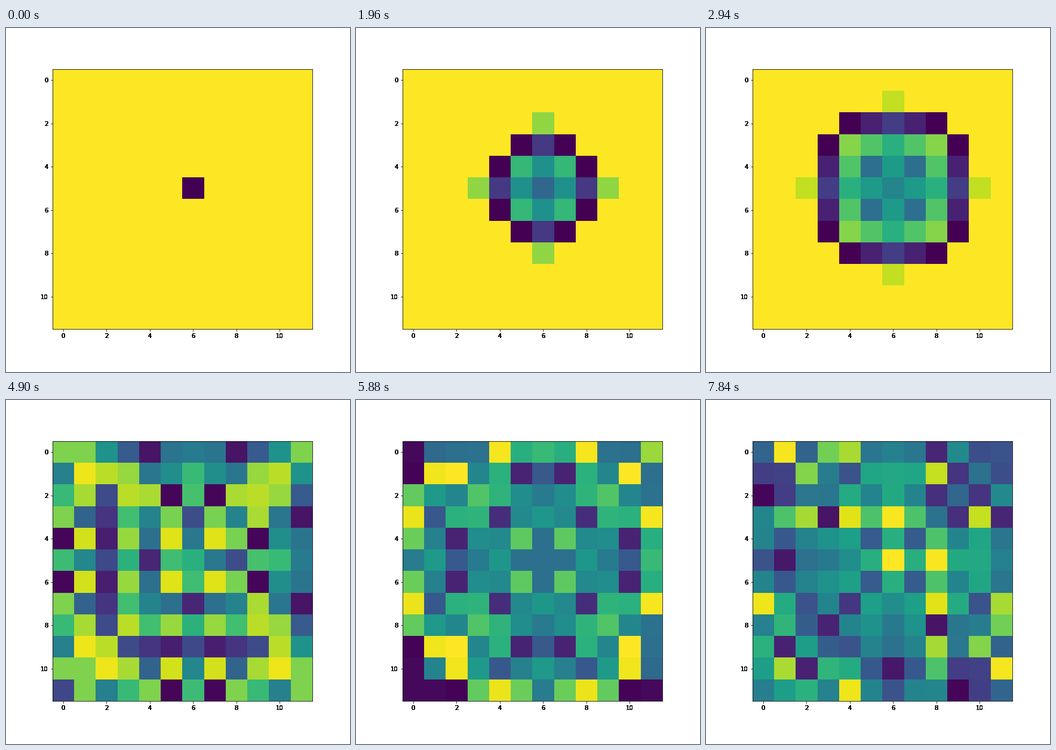
These frames come from a looping animation (576x576 px, 8 s). A matplotlib script:

```python
import numpy as np
import matplotlib.pyplot as plt
from matplotlib.animation import FuncAnimation

SIZE = 12
ROW, COL = 5, 6          # cell where the pattern starts
HOLD, INTERVAL, LOOP = 980, 20, 8000

rows, cols = np.indices((SIZE, SIZE))
dy, dx = abs(rows - ROW), abs(cols - COL)
ring, side = np.maximum(dy, dx), np.minimum(dy, dx)
steps = dy + dx


def rings(axis, slope, ripple=0):
    """Square rings: value on the axis, change per cell, extra on odd cells."""
    axis, slope, ripple = np.broadcast_arrays(axis, slope, ripple)
    r = np.minimum(ring, len(axis) - 1)
    return axis[r] + slope[r] * side + ripple[r] * (side % 2)


def wave(top, reach, axis, slope, ripple=0):
    """Spreading rings with a dark front, four tips and a calm outside."""
    tip = len(axis) - 1
    grid = rings(axis, slope, ripple) / top
    grid[(steps == reach) & (side > 0)] = 0
    grid[(steps > reach) | (ring > tip) | ((ring == tip) & (side > 0))] = 1
    return grid


def tangle(seed, band, core=None, radius=-1):
    """Noise mirrored near both axes and across the rising diagonal."""
    grid = np.random.default_rng(seed).random((SIZE, SIZE))
    for d in range(1, band + 1):
        grid[ROW + d] = grid[ROW - d]
        grid[:, COL + d] = grid[:, COL - d]
    grid = np.where(rows + cols < SIZE, grid, grid[::-1, ::-1].T)
    return grid if core is None else np.where(ring <= radius, core, grid)


crossed = tangle(6, 4, rings([.37, .37, .53, .41, .28],
                             [0, .38, -.2, .12, .18],
                             [0, 0, .14, -.04, -.36]), 4)
crossed[steps > 10] = 0.02

states = [
    wave(1, 0, [0], 0),
    wave(4, 2, [2, 1, 3], 0),
    wave(6, 3, [2, 3, 1, 5], [0, 1, -1, 0]),
    wave(11, 5, [5, 6, 7, 2, 10], [0, -2, 1, -1, 0]),
    wave(17, 8, [12, 9, 2, 14, 11, 6, 16], [0, 4, -.5, -3, 0, -1, 0],
         [0, 0, 1.5, 3, 5, 0, 0]),
    tangle(5, 5),
    crossed,
    tangle(7, 2, rings([1, .58, .43], [0, -.24, -.18], [0, 0, -.25]), 2),
    tangle(8, 1, rings([1, .63], [0, -.34]), 1),
]

fig = plt.figure(figsize=(8, 8), dpi=72, facecolor="white")
ax = fig.add_axes([0.135, 0.125, 0.755, 0.755])
image = ax.imshow(states[0], cmap="viridis", vmin=0, vmax=1)

ticks = range(0, SIZE, 2)
ax.set_xticks(ticks)
ax.set_yticks(ticks)
ax.tick_params(labelbottom=False, labelleft=False)


def label(x, y, text, placement):
    transform, va, ha = placement
    # stacked copies darken the antialiased edges
    for _ in range(8):
        ax.text(x, y, text, transform=transform, va=va, ha=ha,
                fontsize=10, family="DejaVu Sans")


for tick in ticks:
    label(tick, 0, str(tick), ax.get_xaxis_text1_transform(7))
    label(0, tick, str(tick), ax.get_yaxis_text1_transform(7))


def update(frame):
    image.set_data(states[frame * INTERVAL // HOLD])
    return [image]


anim = FuncAnimation(fig, update, frames=LOOP // INTERVAL, interval=INTERVAL,
                     repeat=True, repeat_delay=0)
plt.show()
```
